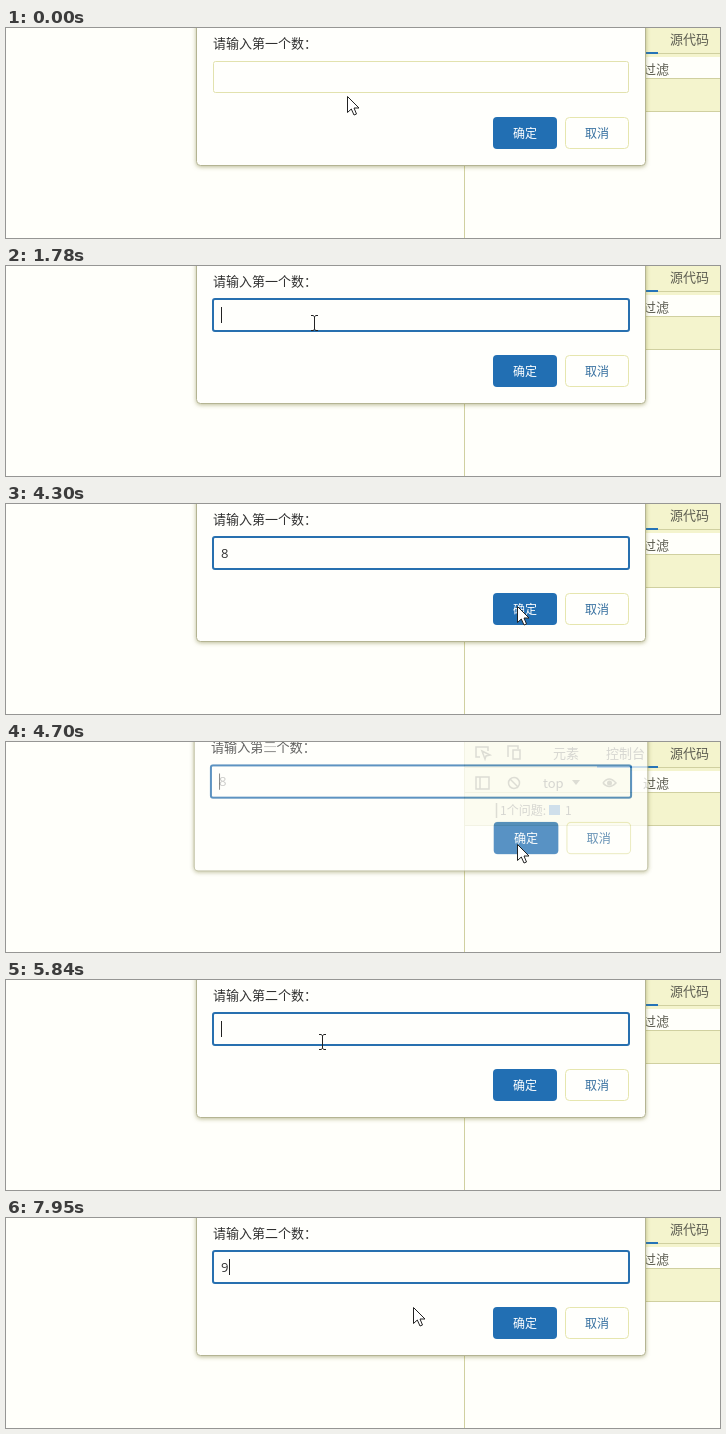
Animation of 714 by 210 pixels, one loop 7.99 s. Source, as an HTML page:

```html
<!DOCTYPE html>
<html lang="zh-CN">
<head>
<meta charset="utf-8">
<title>Prompt dialogs</title>
<style>
  html, body { margin: 0; width: 714px; height: 210px; overflow: hidden; background: #fffffa; }
  svg { display: block; }
  text { font: 13px "Noto Sans CJK SC", "Noto Sans CJK", sans-serif; fill: #303030; }
  .small { font-size: 12px; }
  .tool { fill: #5c5c50; }
  .digit { font-family: "Open Sans", "Noto Sans", sans-serif; }
  .icon { fill: none; stroke: #77775f; stroke-width: 1.5; }
  .edge { stroke: #d0d0a0; }
  .panel { filter: drop-shadow(0 1px 2px rgba(120, 120, 50, .5)); }
</style>
</head>
<body>
<svg width="714" height="210" viewBox="0 0 714 210">
  <defs>
    <g id="frame">
      <rect class="panel" x="190.5" y="-40.5" width="449" height="178" rx="4" fill="#fffffc" stroke="#b4b493"/>
      <rect x="487" y="89" width="64" height="32" rx="4" fill="#226fb3"/>
      <text class="small" x="507" y="110" style="fill:#fff">确定</text>
      <rect x="559.5" y="89.5" width="63" height="31" rx="4" fill="#fffffc" stroke="#e6e6ae"/>
      <text class="small" x="579" y="110" style="fill:#356f9f">取消</text>
    </g>
  </defs>

  <g id="tools">
    <rect x="459" width="255" height="83" fill="#f4f4cd"/>
    <rect x="625" y="29" width="89" height="21" fill="#fffffa"/>
    <path class="edge" d="M458.5 0V210M459 25.5H714M459 50.5H714M459 83.5H714"/>
    <rect x="591" y="24" width="61" height="2" fill="#2674b8"/>
    <path class="icon" d="M482 9V5H470V15H474M476 9L484 13L480 14L479 17ZM502 15V4H512V7M507 8H514V17H507Z"/>
    <path class="icon" d="M470 35H483V47H470ZM474 35V47M597 41Q603 33 610 41Q603 48 597 41M490.5 61V76"/>
    <circle class="icon" cx="508" cy="41" r="5.5"/>
    <path class="icon" d="M504 37L512 45"/>
    <circle cx="603.500" cy="41" r="2.500" fill="#77775f"/>
    <path d="M566 38H574L570 43Z" fill="#77775f"/>
    <g>
      <text class="tool" x="547" y="16">元素</text>
      <text class="tool" x="600" y="16">控制台</text>
      <text class="tool" x="664" y="16">源代码</text>
      <text class="tool" x="537" y="46">top</text>
      <text class="tool" x="637" y="46">过滤</text>
      <text class="tool small" x="494" y="73">1个问题:</text>
      <rect x="543" y="63" width="11" height="10" fill="#3f7fba"/>
      <text class="tool small" x="559" y="73">1</text>
    </g>
  </g>

  <g id="first"></g>
  <g id="second"></g>

  <path id="arrow" d="M.5 .5V16.500L4.300 13L7 19L9.500 18L7 12H12Z" fill="#fff" stroke="#222"/>
  <path id="beam" d="M-3 -7.500H-1L.5 -6.500L2 -7.500H4M.5 -6.500V6.500M-3 7.500H-1L.5 6.500L2 7.500H4" fill="none" stroke="#222"/>
</svg>
<script>
const LOOP = 7990;
const $ = id => document.getElementById(id);
const clamp = v => Math.min(1, Math.max(0, v));
const within = (t, spans) => spans.some(([a, b]) => t >= a && t < b);

// time, x, y of the pointer's hot spot
const path = [
  [0, 341, 68], [40, 339, 68], [160, 320, 62], [320, 308, 57],
  [3280, 308, 57], [3320, 309, 63], [3490, 310, 63], [3650, 348, 66],
  [3900, 440, 84], [4260, 511, 102], [4900, 511, 102], [5190, 435, 93],
  [5500, 360, 73], [5840, 316, 62], [7460, 316, 62], [7950, 407, 89]
];

const dialogs = [
  { id: "first", nth: "一", digit: "8", typed: 2760, focus: 650,
    caret: [[690, 1180], [1740, 2270], [2760, 3280], [3800, 4300]] },
  { id: "second", nth: "二", digit: "9", typed: 6930, focus: 0,
    caret: [[4660, 5160], [5720, 6240], [6770, 7460], [7940, LOOP]] }
];

for (const d of dialogs) {
  d.node = $(d.id);
  d.node.innerHTML = `<use href="#frame"/>
    <text x="207" y="20">请输入第${d.nth}个数：</text>
    <rect class="field" fill="#fffffc"/>
    <text class="digit" x="215" y="54">${d.digit}</text>
    <path class="caret" d="M.5 41V57" stroke="#222"/>`;
  d.field = d.node.querySelector(".field");
  d.text = d.node.querySelector(".digit");
  d.bar = d.node.querySelector(".caret");
}

function set(node, attrs) {
  for (const key in attrs) node.setAttribute(key, attrs[key]);
}

function show(node, on) {
  node.style.display = on ? "" : "none";
}

function pointAt(t) {
  const i = path.findIndex(p => p[0] > t);
  if (i < 0) return path[path.length - 1].slice(1);
  const [a, b] = [path[i - 1], path[i]];
  const k = (t - a[0]) / (b[0] - a[0]);
  return [1, 2].map(n => Math.round(a[n] + (b[n] - a[n]) * k));
}

// lift: 0 is at rest, 1 is raised and slightly enlarged
function pose(d, lift, alpha) {
  const s = 1 + .02 * lift;
  set(d.node, {
    transform: `translate(${415 * (1 - s)} ${-20 * lift}) scale(${s})`,
    opacity: alpha
  });
  show(d.node, alpha > 0);
}

function drawDialog(d, t) {
  const focused = t >= d.focus;
  const typed = t >= d.typed;
  set(d.field, focused
    ? { x: 207, y: 33, width: 416, height: 32, rx: 2, stroke: "#2870af", "stroke-width": 2 }
    : { x: 207.5, y: 33.5, width: 415, height: 31, rx: 2, stroke: "#e2e2ae", "stroke-width": 1 });
  show(d.text, typed);
  show(d.bar, within(t, d.caret));
  set(d.bar, { transform: `translate(${typed ? 223 : 215} 0)` });
}

function draw(t) {
  const closing = clamp((t - 4620) / 160);
  const opening = clamp((t - 4600) / 200);
  pose(dialogs[0], closing, 1 - closing);
  pose(dialogs[1], 1 - opening, opening);
  dialogs.forEach(d => drawDialog(d, t));

  const [x, y] = pointAt(t);
  const typing = y <= 66;
  show($("arrow"), !typing);
  show($("beam"), typing);
  set($(typing ? "beam" : "arrow"), { transform: `translate(${x} ${y})` });
}

const start = performance.now();
function tick(now) {
  draw(Math.max(0, now - start) % LOOP);
  requestAnimationFrame(tick);
}
draw(0);
requestAnimationFrame(tick);
</script>
</body>
</html>
```
